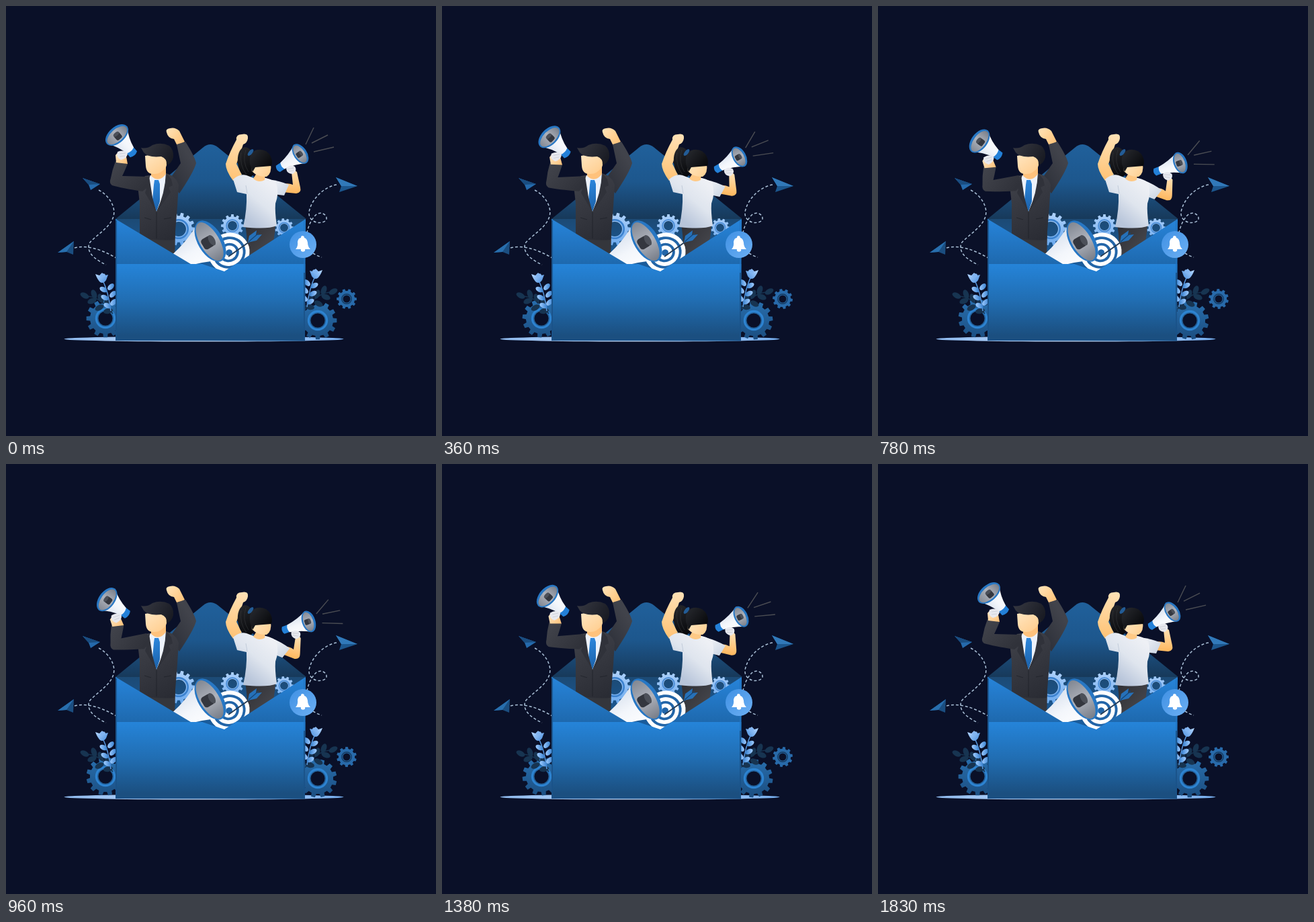
Write an HTML page with a canvas that moves like this. It is 640 px wide and 640 px high and loops after 1860 ms.

```html
<!DOCTYPE html>
<html>
<head>
<meta charset="utf-8">
<style>
html, body { margin: 0; width: 100%; height: 100%; overflow: hidden; background: #0a1028; }
canvas { display: block; width: 640px; height: 640px; }
</style>
</head>
<body>
<canvas id="stage" width="640" height="640"></canvas>
<script>
const ctx = document.getElementById('stage').getContext('2d');
const LOOP = 1860, TAU = Math.PI * 2;
const BG = '#0a1028';

function grad(x0, y0, x1, y1, ...colors) {
  const g = ctx.createLinearGradient(x0, y0, x1, y1);
  colors.forEach((c, i) => g.addColorStop(i / (colors.length - 1), c));
  return g;
}
function shape(d, fill) {
  ctx.fillStyle = fill;
  ctx.fill(new Path2D(d));
}
function line(d, color, width, dash = []) {
  ctx.strokeStyle = color;
  ctx.lineWidth = width;
  ctx.setLineDash(dash);
  ctx.stroke(new Path2D(d));
  ctx.setLineDash([]);
}
function oval(x, y, rx, ry, fill, turn = 0) {
  ctx.fillStyle = fill;
  ctx.beginPath();
  ctx.ellipse(x, y, rx, ry, turn, 0, TAU);
  ctx.fill();
}
function pivot(x, y, angle, draw) {
  ctx.save();
  ctx.translate(x, y);
  ctx.rotate(angle);
  ctx.translate(-x, -y);
  draw();
  ctx.restore();
}

function gear(x, y, r, n, hole, fill, ring, turn = 0) {
  const step = TAU / n, root = r * 0.81;
  ctx.beginPath();
  for (let i = 0; i < n; i++) {
    for (const [rad, off] of [[root, -.3], [r, -.2], [r, .2], [root, .3]]) {
      const a = turn + (i + off) * step;
      ctx.lineTo(x + rad * Math.cos(a), y + rad * Math.sin(a));
    }
  }
  ctx.closePath();
  ctx.moveTo(x + hole, y);
  ctx.arc(x, y, hole, 0, TAU);
  ctx.fillStyle = fill;
  ctx.fill('evenodd');
  ctx.strokeStyle = ring;
  ctx.lineWidth = r * 0.11;
  ctx.beginPath();
  ctx.arc(x, y, hole + r * 0.11, 0, TAU);
  ctx.stroke();
}

// Horn with its mouth at (x, y) and its handle pointing along the angle.
function horn(x, y, r, len, deg, flat) {
  ctx.save();
  ctx.translate(x, y);
  ctx.rotate(deg * Math.PI / 180);
  const neck = r * 0.34, end = len * 0.8;
  ctx.beginPath();
  ctx.moveTo(end - 1, -neck);
  ctx.lineTo(len, -neck);
  ctx.quadraticCurveTo(len + 4, 0, len, neck);
  ctx.lineTo(end - 1, neck);
  ctx.fillStyle = '#2380d8';
  ctx.fill();
  ctx.beginPath();
  ctx.moveTo(0, -r);
  ctx.quadraticCurveTo(len * 0.38, -r * 0.5, end, -neck);
  ctx.quadraticCurveTo(end + 3, 0, end, neck);
  ctx.quadraticCurveTo(len * 0.38, r * 0.5, 0, r);
  ctx.fillStyle = grad(0, -r, 0, r, '#ffffff', '#f3f6fb', '#d5dfed');
  ctx.fill();
  oval(0, 0, r * flat, r, '#2777c4');
  oval(r * .03, 0, r * (flat - .08) - 1.3, r - 2, grad(0, -r, 0, r, '#747a85', '#aeb2bb', '#7f8590'));
  ctx.fillStyle = '#34373f';
  ctx.beginPath();
  ctx.roundRect(-r * .12, -r * .25, r * .5, r * .5, r * .13);
  ctx.fill();
  oval(-r * .08, 0, r * .13, r * .25, '#4c5059');
  ctx.restore();
}

function ground() {
  oval(294.5, 495.6, 208, 4, grad(87, 0, 502, 0, '#8fbbf0', '#c5dcfa', '#76aeef'));
}

function trails() {
  const c = '#a9bfd6';
  line('M138 274C152 281 164 298 160 313C155 330 135 340 124 353C120 364 127 375 149 385', c, 1.5, [4, 3]);
  line('M102 360C123 355 145 364 164 375', c, 1.5, [4, 3]);
  line('M492 266C473 269 454 288 451 307C450 321 466 326 475 320C482 314 470 303 461 311C453 319 449 330 447 343', c, 1.5, [4, 3]);
  line('M447 358Q456 370 470 374', c, 1.5, [4, 3]);
  shape('M114 256L140 265L126 274L123 266Z', '#256aac');
  shape('M114 256L140 265L123 266Z', '#1a4d80');
  shape('M77 367L101 350L100 370L90 366Z', '#1b4e80');
  shape('M77 367L101 350L90 366Z', '#286fae');
  shape('M491 255L523 268L496 277L499 268Z', '#1c568d');
  shape('M491 255L523 268L499 268Z', '#3179b9');
}

function plant(x, y, dir) {
  ctx.save();
  ctx.translate(x, y);
  ctx.scale(dir, 1);
  const dark = '#173451';
  line('M16 54Q-4 26 -28 28', dark, 1.5);
  [[-26, 27, .5], [-12, 25, 1.2], [-15, 35, -.4], [-2, 31, 1.2], [-4, 45, -.5], [8, 39, 1.1], [9, 50, -.2]]
    .forEach(([a, b, t]) => oval(a, b, 7, 4, dark, t));
  line('M0 2Q10 23 13 50', '#5b9be2', 1.5);
  [[2, 18, .5], [13, 14, -.8], [4, 30, .5], [16, 25, -.8], [8, 42, .5], [17, 37, -.8]]
    .forEach(([a, b, t]) => oval(a, b, 6, 3.6, grad(a - 5, b, a + 5, b, '#9dcaff', '#3b83d0'), t));
  shape('M-10 -5L-4 -3L0 -7L4 -3L9 -4L6 4Q2 10 -3 7Q-7 3 -10 -5Z', grad(-8, -5, 6, 7, '#b0d4ff', '#5697e2'));
  oval(1, -3, 4, 2.5, '#82b5f2', -.2);
  ctx.restore();
}

function backdrop(turn) {
  ground();
  trails();
  const low = grad(0, 438, 0, 494, '#286ead', '#1c4f82');
  gear(148, 465, 28.5, 12, 10.5, low, '#2d83d1', turn * TAU / 12);
  gear(464, 468, 28.5, 12, 10.5, low, '#2d83d1', -turn * TAU / 12);
  gear(507, 436, 15, 10, 5.5, '#286aaa', '#173f67', turn * TAU / 10);
  plant(143, 404, 1);
  plant(461, 398, -1);
  shape('M163 317L294 210Q304 202 315 210L447 317Z', grad(0, 206, 0, 317, '#20609b', '#1d578d', '#17395a'));
  shape('M163 317H445V440H163Z', grad(0, 317, 0, 384, '#1c4a75', '#1a5c9b'));
  const pale = grad(0, 307, 0, 354, '#b0d2fb', '#6eabee');
  gear(257, 332, 24.5, 14, 11, pale, '#3d83cf');
  gear(337, 327, 17, 12, 7, pale, '#4a8cd5');
  gear(414, 330, 14, 11, 6, pale, '#4a8cd5');
}

function target() {
  [[31, '#fff'], [25, '#2265a8'], [21, '#fff'], [15, '#2265a8'], [11, '#fff'], [5, '#2265a8']]
    .forEach(([r, c]) => oval(332, 367, r, r * .94, c, -.5));
  line('M331 373L372 344', '#253d57', 2);
  shape('M360 352L362 342L373 334L372 341L381 340L373 349Z', '#2671b9');
  line('M361 351L376 338', '#174573', 1.2);
}

function man(k) {
  const suit = grad(198, 250, 255, 345, '#41434b', '#292b33');
  shape('M202 337H252L251 382H202Z', '#34363c');
  // raised fist
  shape('M239 188Q237 183 244 182Q252 180 258 186L266 202L255 208L250 198Q241 197 239 188Z', grad(240, 184, 264, 204, '#ffe2b6', '#ffc379'));
  shape('M254 206L267 202Q281 224 283 234Q279 248 258 279L242 260L260 234Z', grad(280, 235, 247, 256, '#41434b', '#30333c'));
  shape('M207 253L238 249Q253 253 257 266L255 298L251 348Q225 350 199 344L199 294L196 267Z', suit);
  shape('M215 252L238 248Q237 278 224 306Q216 285 213 257Z', '#edf2fb');
  shape('M221 259L227 259L229 265L229 291L224 306L218 289L220 266Z', grad(219, 260, 230, 303, '#2c86dc', '#1c62aa'));
  shape('M213 253L207 260L204 269L209 272L207 278L224 307L218 285Z', '#30323a');
  shape('M239 249L246 258L248 267L242 270L245 277L224 307L235 279Z', '#30323a');
  line('M224 307L224 346M206 315L216 318M235 317L246 315', '#20222a', .8);
  shape('M216 239L238 232V250Q228 264 216 253Z', '#ffc27c');
  shape('M207 223L235 218Q242 232 238 240Q230 251 219 250Q209 250 208 238Z', grad(211, 222, 231, 251, '#ffe4bd', '#ffce90'));
  shape('M201 211Q210 213 218 207Q231 202 243 208Q250 214 249 225Q247 234 239 237Q240 227 231 224Q211 226 205 218Z', grad(205, 207, 247, 234, '#353740', '#171921'));

  pivot(201, 263, -.223 * k, () => {
    shape('M163 231L181 235Q176 247 173 253L211 254Q218 266 203 276Q172 271 158 267Q153 264 156 256Q158 244 163 231Z',
      grad(163, 235, 199, 275, '#41434b', '#30323a'));
    shape('M163 222Q169 214 178 219L181 235L164 233Z', grad(164, 217, 179, 234, '#ffe9c7', '#ffc47e'));
    horn(165, 192, 20, 38, 49, .6);
    shape('M166 217Q177 213 181 220Q180 227 171 229Q163 225 166 217Z', '#e8e9ef');
    line('M169 220L178 219M169 224L177 223', '#c9cdd7', .8);
  });
}

function woman(k) {
  shape('M356 326L401 325Q400 348 392 380L354 382Q362 357 356 326Z', grad(357, 330, 400, 365, '#303035', '#48494f'));
  // raised fist and bare arm
  shape('M343 199Q342 191 351 191Q361 189 360 197Q359 204 353 206Q348 222 343 235L351 251L338 260Q327 245 327 235Q333 217 343 199Z',
    grad(343, 193, 338, 258, '#ffe0b3', '#ffc376'));
  oval(358, 233, 13, 23, grad(347, 212, 366, 252, '#25262a', '#08090c'), -.13);
  line('M350 218Q347 237 358 251M357 214Q351 232 361 247', '#333437', .7);

  pivot(389, 275, .26 * k, () => {
    shape('M413 265Q420 263 427 266L425 247Q428 242 433 247L438 270Q440 278 432 279L412 277Z', grad(424, 245, 424, 280, '#ffe1b5', '#ffb65b'));
    shape('M390 258Q407 260 421 266L414 282L390 279Z', grad(395, 261, 417, 281, '#f1f3f7', '#ccd6e4'));
    horn(438, 220, 16.5, 40, 146, .6);
    shape('M417 242Q422 235 430 239Q434 245 427 250Q418 250 417 242Z', '#e8e9ef');
    line('M419 243L428 241M420 246L428 245', '#c8ccd5', .8);
    line('M446 206L458 181M455 204L479 192M458 217L488 210', '#4b4d53', 1.4);
  });
  shape('M338 258Q348 249 358 252L371 257Q388 252 402 263Q407 279 401 294Q400 306 403 327Q389 333 353 329Q359 302 358 280L344 277Z',
    grad(355, 316, 397, 265, '#b8c5da', '#dfe5ee', '#eef0f5'));
  line('M359 279L357 267', '#bac5d5', .8);
  shape('M373 249L386 250L385 259Q376 264 368 257Z', '#ffc985');
  shape('M365 229L394 235Q396 249 388 254Q375 255 366 246Z', grad(368, 238, 391, 254, '#ffe4bb', '#ffd194'));
  shape('M363 235Q361 217 374 214Q388 212 394 224Q397 231 395 238L371 240L367 247Z', grad(367, 216, 393, 239, '#25272c', '#08090c'));
  oval(364, 218, 2.7, 6, '#235c96', .7);
}

function pocket() {
  ctx.save();
  ctx.clip(new Path2D('M163 317L275 384H292L325 395L446 317L445 498H163Z'));
  ctx.fillStyle = grad(0, 317, 0, 384, '#2784da', '#1e69ae');
  ctx.fillRect(163, 317, 283, 67);
  ctx.fillStyle = grad(0, 384, 0, 490, '#2584d9', '#216eb3', '#1b4f80');
  ctx.fillRect(163, 384, 283, 115);
  ctx.restore();
  line('M164 319V497L444 497.5V397', '#1b5389', 1.8);
  line('M444 319V397', '#2276c3', 1.5);
}

function badge() {
  oval(442, 355, 20, 20, grad(428, 341, 456, 369, '#4695e6', '#66abf1'));
  shape('M431 362Q435 358 434 351Q435 345 439 345Q439 342 441 342Q444 342 444 345Q448 346 449 352Q449 358 453 362Z', '#fff');
  oval(442, 363, 3.2, 2.7, '#fff');
}

function frame(now) {
  const p = now % LOOP / LOOP;
  const k = (1 - Math.cos(TAU * p)) / 2;
  ctx.fillStyle = BG;
  ctx.fillRect(0, 0, 640, 640);
  backdrop(p);
  man(k);
  woman(k);
  target();
  horn(304, 350, 34, 76, 149, .54);
  pocket();
  badge();
}

const start = performance.now();
function tick(now) {
  frame(Math.max(0, now - start));
  requestAnimationFrame(tick);
}
requestAnimationFrame(tick);
</script>
</body>
</html>
```
